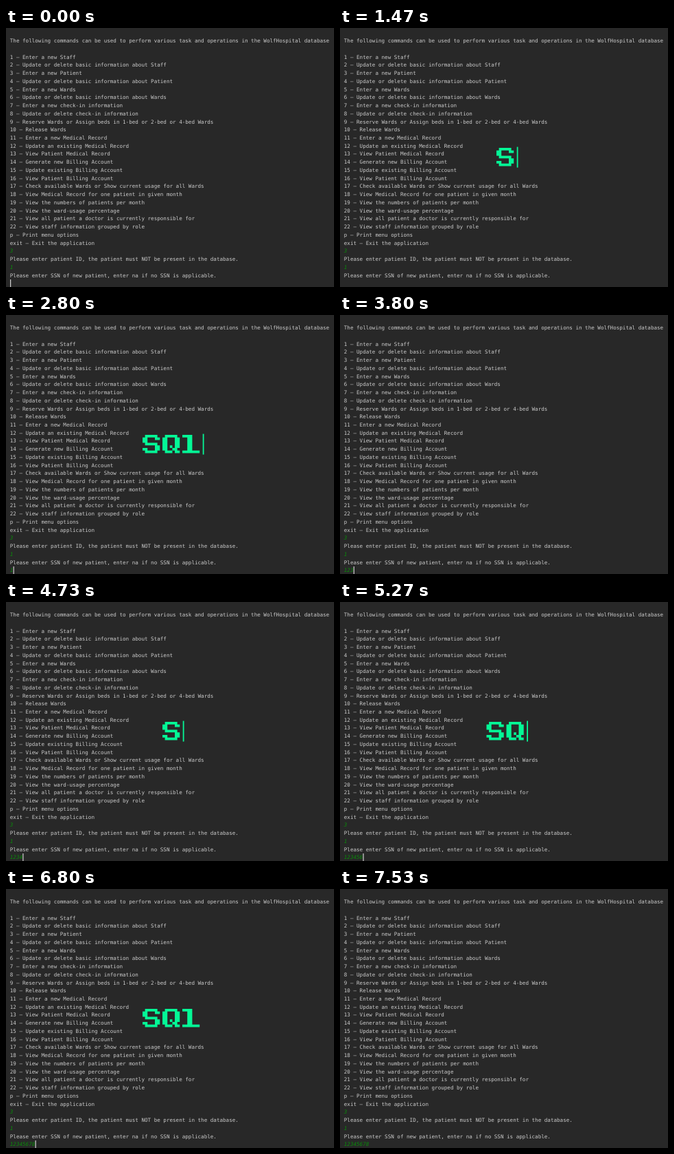
Write an HTML page that moves like this. It is 478x376 px and loops after 8000 ms.

```html
<!DOCTYPE html>
<html lang="en">
<head>
<meta charset="utf-8">
<title>Terminal</title>
<style>
  html, body { margin: 0; width: 100%; height: 100%; overflow: hidden; background: #282828; }
  svg { display: block; }
  text {
    font: 7.59px "DejaVu Sans Mono", "Liberation Mono", monospace;
    fill: #cacaca;
    text-rendering: geometricPrecision;
  }
  .input { fill: #0a8c0a; font-style: italic; }
  .title { fill: #04f896; }
</style>
</head>
<body>
<svg id="stage" width="478" height="376" viewBox="0 0 478 376"></svg>
<script>
const LOOP = 8000;
const LEFT = 5.8, BASE = 21.1, PITCH = 11.74, CHAR = 4.57;

const menu = `Enter a new Staff
Update or delete basic information about Staff
Enter a new Patient
Update or delete basic information about Patient
Enter a new Wards
Update or delete basic information about Wards
Enter a new check-in information
Update or delete check-in information
Reserve Wards or Assign beds in 1-bed or 2-bed or 4-bed Wards
Release Wards
Enter a new Medical Record
Update an existing Medical Record
View Patient Medical Record
Generate new Billing Account
Update existing Billing Account
View Patient Billing Account
Check available Wards or Show current usage for all Wards
View Medical Record for one patient in given month
View the numbers of patients per month
View the ward-usage percentage
View all patient a doctor is currently responsible for
View staff information grouped by role`.split("\n").map((s, i) => `${i + 1} – ${s}`);

const lines = [
  "The following commands can be used to perform various task and operations in the WolfHospital database",
  "",
  ...menu,
  "p – Print menu options",
  "exit – Exit the application",
  "3",
  "Please enter patient ID, the patient must NOT be present in the database.",
  "1",
  "Please enter SSN of new patient, enter na if no SSN is applicable.",
];

// Block letters, 7 by 7 cells
const letters = [
  [".#####.", "##...##", "##.....", ".#####.", ".....##", "##...##", ".#####."],
  [".#####.", "##...##", "##...##", "##...##", "##.#.##", "##..##.", ".###.##"],
  ["####...", "..##...", "..##...", "..##...", "..##...", "..##...", "#######"],
];
const CELL_W = 3.6, CELL_H = 3.8, ADVANCE = 29, CENTER = 242.5;

// [start time, value]
const typed = [[0, 0], [2800, 1], [3000, 2], [3470, 3], [4530, 4], [4870, 5], [5200, 6], [5600, 7], [6800, 8]];
const caretOn = [[0, 1], [400, 0], [930, 1], [1400, 0], [1870, 1], [2330, 0], [2800, 1],
  [4000, 0], [4530, 1], [6400, 0], [6800, 1], [7400, 0]];

// The title types, holds and clears in its own cycle
const TITLE_START = 67, TITLE_CYCLE = 3732, BLINK = 466.5;
const titleTyped = [[0, 0], [730, 1], [1461, 2], [2199, 3]];

const stage = document.getElementById("stage");

function add(parent, name, attrs = {}, text = "") {
  const el = document.createElementNS("http://www.w3.org/2000/svg", name);
  for (const key in attrs) el.setAttribute(key, attrs[key]);
  el.textContent = text;
  return parent.appendChild(el);
}

function addLine(text, row, input) {
  return add(stage, "text", { x: LEFT, y: BASE + row * PITCH, class: input ? "input" : "" }, text);
}

function letterPath(rows, x) {
  let d = "";
  rows.forEach((row, r) => {
    for (const run of row.matchAll(/#+/g)) {
      const w = run[0].length * CELL_W;
      d += `M${x + run.index * CELL_W} ${r * CELL_H}h${w}v${CELL_H}h${-w}z`;
    }
  });
  return d;
}

function at(steps, t) {
  let value = steps[0][1];
  for (const [start, next] of steps) if (t >= start) value = next;
  return value;
}

function show(el, on) {
  el.setAttribute("visibility", on ? "visible" : "hidden");
}

lines.forEach((s, i) => s && addLine(s, i, /^\d$/.test(s)));
const answer = addLine("", lines.length, true);
const caret = add(stage, "rect", { y: 365, width: 1.2, height: 11, fill: "#d0d0d0" });

const word = add(stage, "g", { class: "title", role: "img", "aria-label": "SQL" });
const glyphs = letters.map((rows, i) => add(word, "path", { d: letterPath(rows, i * ADVANCE) }));
const bar = add(stage, "rect", { class: "title", width: 1.8, height: 30 });

function draw(t) {
  const n = at(typed, t);
  answer.textContent = "12345678".slice(0, n);
  caret.setAttribute("x", LEFT + n * CHAR + 0.2);
  show(caret, at(caretOn, t));

  const phase = t < TITLE_START ? 0 : (t - TITLE_START) % TITLE_CYCLE;
  const count = at(titleTyped, phase);
  const half = count * ADVANCE / 2;
  word.setAttribute("transform", `translate(${CENTER - half} 174)`);
  glyphs.forEach((g, i) => show(g, i < count));
  bar.setAttribute("x", CENTER + 0.7 + half);
  bar.setAttribute("y", count ? 172.6 : 167);
  show(bar, Math.floor(phase / BLINK) % 2);
}

const begin = performance.now();
function tick() {
  draw((performance.now() - begin) % LOOP);
  requestAnimationFrame(tick);
}
tick();
</script>
</body>
</html>
```
